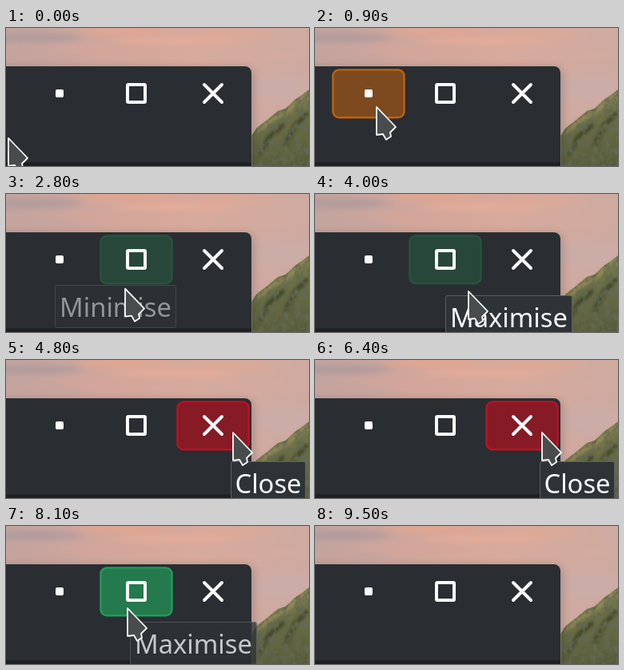
These frames come from a looping animation (379x173 px, 9.9 s). An HTML page:

```html
<!DOCTYPE html>
<html lang="en">
<head>
<meta charset="utf-8">
<title>Window buttons</title>
<style>
  html, body { margin: 0; width: 100%; height: 100%; overflow: hidden; background: #2a2e32; }
  svg { display: block; }
  text { font: 32.7px "Noto Sans", sans-serif; fill: #fcfcfc; }
</style>
</head>
<body>
<svg width="379" height="173" viewBox="0 0 379 173">
  <defs>
    <linearGradient id="sky" x2="1" y2=".25">
      <stop offset="0" stop-color="#c0a39f"/>
      <stop offset=".3" stop-color="#d0a69c"/>
      <stop offset=".65" stop-color="#d8aa9c"/>
      <stop offset="1" stop-color="#cdaaa1"/>
    </linearGradient>
    <linearGradient id="hill" x1=".6" y1="0" x2=".8" y2="1">
      <stop offset="0" stop-color="#85814f"/>
      <stop offset=".5" stop-color="#6a6b42"/>
      <stop offset="1" stop-color="#565a3a"/>
    </linearGradient>
    <filter id="soft" x="-50%" y="-100%" width="200%" height="300%"><feGaussianBlur stdDeviation="9 3"/></filter>
    <filter id="shade" x="-20%" y="-30%" width="140%" height="160%"><feGaussianBlur stdDeviation="6"/></filter>
    <filter id="blur"><feGaussianBlur stdDeviation="2"/></filter>
    <filter id="grass" x="0" y="0" width="1" height="1">
      <feTurbulence type="fractalNoise" baseFrequency=".13 .1" numOctaves="4" seed="4"/>
      <feColorMatrix values="0 0 0 0 .12  0 0 0 0 .14  0 0 0 0 .08  3 0 0 0 -1.2"/>
      <feComposite in2="SourceGraphic" operator="in"/>
    </filter>
    <path id="slope" d="M300 173V142L307 135L314 125L326 116L340 104L350 101L360 91L370 84L379 77V173Z"/>
  </defs>

  <rect width="379" height="173" fill="url(#sky)"/>
  <g id="clouds" filter="url(#soft)"></g>
  <use href="#slope" fill="url(#hill)"/>
  <g filter="url(#blur)" fill="none" stroke-linecap="round">
    <path d="M314 130L334 114L349 106L363 95L377 84" stroke="#98915c" stroke-width="4"/>
    <path d="M318 156L330 136L346 122M350 146L362 122L376 108" stroke="#40442a" stroke-width="6"/>
  </g>
  <use href="#slope" filter="url(#grass)"/>

  <rect x="-30" y="50" width="339" height="150" rx="8" opacity=".2" filter="url(#shade)"/>
  <rect x="-30" y="48" width="337" height="150" rx="8" fill="#2a2e32"/>
  <rect x="-30" y="47.5" width="337.5" height="150" rx="8.5" fill="none" stroke="#aaa5a2" stroke-opacity=".35"/>
  <rect y="168.5" width="307" height="5" fill="#1d2023"/>

  <g id="highlights" stroke-width="2.4"></g>
  <rect x="62" y="77" width="10" height="10" rx="2" fill="#fcfcfc"/>
  <g fill="none" stroke="#fcfcfc" stroke-width="4" stroke-linecap="round">
    <rect x="152" y="71" width="22" height="22" rx="1"/>
    <path d="M248 71L270 93M270 71L248 93"/>
  </g>
  <g id="tips"></g>
  <path id="pointer" d="M0 0L24 25L17 32L18 37L12 41L8 34L0 35Z"
        fill="#484c4c" stroke="#fcfcfc" stroke-width="1.8" stroke-linejoin="round"/>
</svg>
<script>
const LOOP = 9900, STEP = 100;
const get = id => document.getElementById(id);

function add(parent, tag, attrs, text = '') {
  const node = document.createElementNS('http://www.w3.org/2000/svg', tag);
  for (const key in attrs) node.setAttribute(key, attrs[key]);
  node.textContent = text;
  return parent.appendChild(node);
}

// Linear interpolation through [time, ...values] keys.
function sample(keys, t) {
  const next = keys.findIndex(key => key[0] > t);
  if (next === 0) return keys[0].slice(1);
  if (next < 0) return keys[keys.length - 1].slice(1);
  const a = keys[next - 1], b = keys[next];
  const f = (t - a[0]) / (b[0] - a[0]);
  return a.slice(1).map((v, i) => v + (b[i + 1] - v) * f);
}

const fade = (inStart, inEnd, outStart, outEnd) =>
  [[inStart, 0], [inEnd, 1], [outStart, 1], [outEnd, 0]];

// x, y, horizontal radius, vertical radius, colour
[[35, 12, 60, 6, '#b39b9c'], [30, 38, 70, 6, '#c6a49e'], [150, 4, 60, 4, '#e3a68f'],
 [210, 16, 75, 4, '#e6ab97'], [130, 30, 60, 4, '#d5a599'], [285, 8, 45, 4, '#dda895'],
 [300, 34, 70, 5, '#d4aa9f'], [345, 75, 45, 18, '#ccaca6']
].forEach(([cx, cy, rx, ry, fill]) => add(get('clouds'), 'ellipse', { cx, cy, rx, ry, fill }));

const highlights = [
  { x: 22, fill: '#7c4a1e', stroke: '#c0620f', keys: fade(600, 900, 2000, 2300) },
  { x: 118, fill: '#247a4c', stroke: '#1f9d58',
    keys: [...fade(2700, 3000, 3800, 4100), ...fade(7100, 7500, 8100, 8400)] },
  { x: 214, fill: '#861a25', stroke: '#c01022', keys: fade(4300, 4700, 6400, 6700) }
].map(({ x, fill, stroke, keys }) => ({
  keys,
  node: add(get('highlights'), 'rect', { x: x + .5, y: 52.4, width: 89, height: 59.8, rx: 7.5, fill, stroke })
}));

const tips = [
  { label: 'Minimise', x: 61, y: 114, width: 152, keys: fade(1400, 1600, 2700, 2900) },
  { label: 'Maximise', x: 163, y: 127, width: 159, keys: fade(2800, 3100, 4300, 4500) },
  { label: 'Close', x: 281, y: 127, width: 94, keys: fade(4500, 4800, 6900, 7200) },
  { label: 'Maximise', x: 155, y: 120, width: 159, keys: fade(7300, 7500, 8000, 8400) }
].map(({ label, x, y, width, keys }) => {
  const node = add(get('tips'), 'g', {});
  add(node, 'rect', { x: x + .5, y: y + .5, width: width - 1, height: 53, rx: 2, fill: '#2e3337', stroke: '#5c6063' });
  add(node, 'text', { x: x + width / 2, y: y + 40, 'text-anchor': 'middle' }, label);
  return { keys, node };
});

const pointerPath = [
  [300, 3, 138], [600, 42, 116], [900, 77, 99], [1100, 77, 99], [1200, 58, 97], [1700, 58, 97],
  [2000, 85, 108], [2400, 143, 123], [2700, 143, 123], [3000, 161, 110], [3700, 161, 110],
  [4000, 192, 122], [4500, 272, 112], [4700, 278, 104], [4800, 284, 91], [6400, 284, 91],
  [6700, 215, 122], [7000, 152, 118], [7300, 152, 103], [8100, 152, 103], [8400, 108, 121],
  [9000, 7, 140], [9400, -27, 150]
];

function draw(now) {
  const t = Math.floor(now % LOOP / STEP) * STEP;
  for (const { node, keys } of [...highlights, ...tips]) node.setAttribute('opacity', sample(keys, t)[0]);
  get('pointer').setAttribute('transform', `translate(${sample(pointerPath, t)})`);
}

const start = performance.now();
function tick() {
  draw(performance.now() - start);
  requestAnimationFrame(tick);
}
tick();
</script>
</body>
</html>
```
